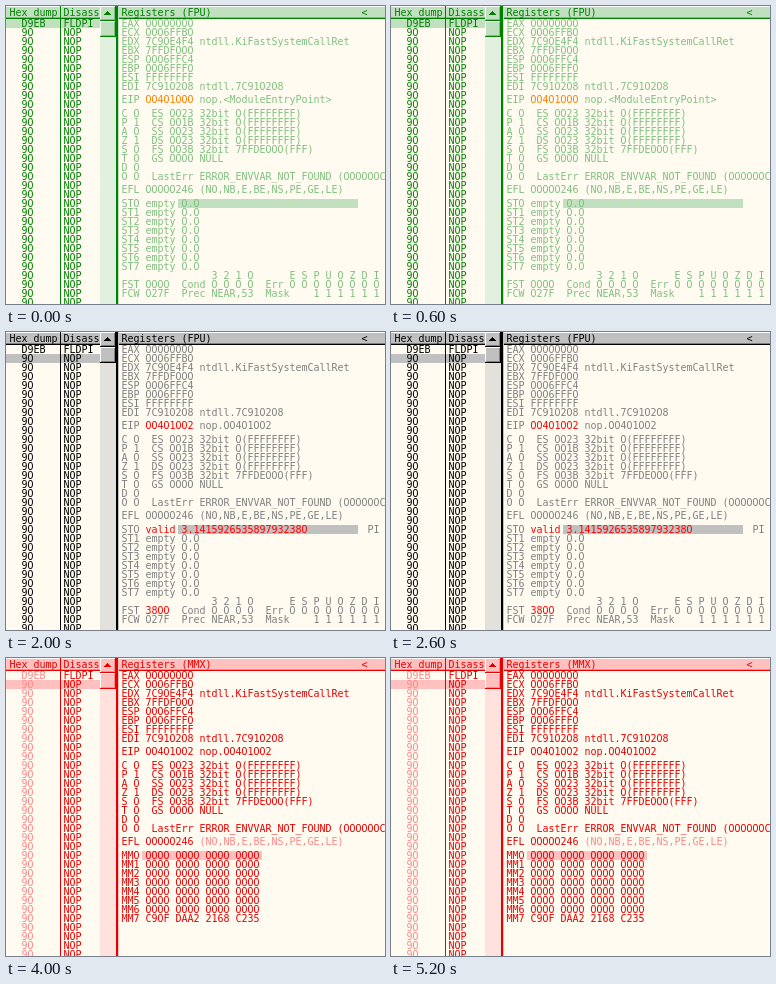
These frames come from a looping animation (379x298 px, 6000 ms). An HTML page with a canvas:

```html
<!DOCTYPE html>
<html lang="en">
<head>
<meta charset="utf-8">
<title>Debugger registers</title>
<style>
html, body { margin: 0; width: 379px; height: 298px; overflow: hidden; background: #fffbf0; }
canvas { display: block; }
</style>
</head>
<body>
<canvas id="stage" width="379" height="298"></canvas>
<script>
const ctx = document.getElementById('stage').getContext('2d');
const W = 379, H = 298, CELL = 6, ROW = 9, TOP = 13, LEFT = 116;
const PAPER = '#fffbf0';

const green = { ink: '#008000', dim: '#80c080', fill: '#c0e0c0', track: '#e2f0e0', hot: '#ff8000' };
const mono = { ink: '#000000', dim: '#808080', fill: '#c0c0c0', track: '#e3e1dc', hot: '#ff0000' };
const red = { ink: '#e80000', dim: '#ff8888', fill: '#ffc0c0', track: '#ffe2de', hot: '#e80000' };

const scenes = [
  { until: 1000, pal: green, row: 0 },
  { until: 2000, pal: mono, row: 0 },
  { until: 3000, pal: mono, row: 1, loaded: true },
  { until: 4000, pal: mono, row: 1, mmx: true },
  { until: 6000, pal: red, row: 1, mmx: true }
];

function box(x, y, w, h, color) {
  ctx.fillStyle = color;
  ctx.fillRect(x, y, w, h);
}

// One character per cell; zero comes from a face without an inner mark.
function print(text, x, base, color) {
  ctx.fillStyle = color;
  ctx.textAlign = 'center';
  for (let i = 0; i < text.length; i++) {
    const c = text[i];
    if (c === ' ') continue;
    ctx.font = c === '0' ? '10px "DejaVu Sans", sans-serif' : '10px "DejaVu Sans Mono", monospace';
    ctx.fillText(c, x + i * CELL + 2.5, base);
  }
}

function raised(x, y, w, h, p) {
  box(x, y, w, h, p.ink);
  box(x, y, w - 1, h - 1, '#ffffff');
  box(x + 1, y + 1, w - 2, h - 2, p.dim);
  box(x + 1, y + 1, w - 3, h - 3, p.fill);
}

function header(x, w, title, tx, p) {
  box(x, 0, w, 12, p.fill);
  box(x, 0, w, 1, '#ffffff');
  box(x, 11, w, 1, p.dim);
  box(x, 12, w, 1, p.ink);
  print(title, tx, 10, p.ink);
}

function scrollbar(p) {
  box(94, 0, 16, H, p.track);
  raised(94, 0, 16, 15, p);
  raised(94, 15, 16, 16, p);
  for (let i = 0; i < 4; i++) box(101 - i, 5 + i, 1 + 2 * i, 1, p.ink);
}

function listing(s) {
  const p = s.pal;
  box(0, TOP + s.row * ROW, 94, ROW, p.fill);
  for (let i = 0, y = TOP; y < H; i++, y += ROW) {
    print(i ? '90' : 'D9EB', 16, y + 8, s.mmx ? p.dim : p.ink);
    print(i ? 'NOP' : 'FLDPI', 58, y + 8, p.ink);
  }
  header(0, 54, 'Hex dump', 4, p);
  header(55, 39, 'Disass', 58, p);
  box(54, 0, 1, H, p.ink);
  scrollbar(p);
  box(110, 0, 2, H, p.ink);
  box(112, 0, 1, H, p.fill);
}

function registers(s) {
  const p = s.pal, ink = s.mmx ? p.ink : p.dim;
  const put = (text, col, y, color = ink) => print(text, LEFT + col * CELL, y + 8, color);
  const lines = (list, y) => list.forEach((t, i) => put(t, 0, y + i * ROW));

  header(113, W - 113, 'Registers (' + (s.mmx ? 'MMX' : 'FPU') + ')', LEFT, p);
  print('<', 356, 10, p.ink);

  lines([
    'EAX 00000000', 'ECX 0006FFB0', 'EDX 7C90E4F4 ntdll.KiFastSystemCallRet', 'EBX 7FFDF000',
    'ESP 0006FFC4', 'EBP 0006FFF0', 'ESI FFFFFFFF', 'EDI 7C910208 ntdll.7C910208'
  ], TOP);

  put('EIP', 0, 89);
  put(s.row ? '00401002' : '00401000', 4, 89, p.hot);
  put(s.row ? 'nop.00401002' : 'nop.<ModuleEntryPoint>', 13, 89);

  lines([
    'C 0  ES 0023 32bit 0(FFFFFFFF)', 'P 1  CS 001B 32bit 0(FFFFFFFF)',
    'A 0  SS 0023 32bit 0(FFFFFFFF)', 'Z 1  DS 0023 32bit 0(FFFFFFFF)',
    'S 0  FS 003B 32bit 7FFDE000(FFF)', 'T 0  GS 0000 NULL', 'D 0',
    'O 0  LastErr ERROR_ENVVAR_NOT_FOUND (000000CB)'
  ], 103);

  put('EFL 00000246', 0, 179);
  put('(NO,NB,E,BE,NS,PE,GE,LE)', 13, 179, p.dim);

  if (s.mmx) vectors(p, put);
  else floats(s, p, put, lines);
}

function vectors(p, put) {
  box(136, 193, 120, ROW, p.fill);
  for (let i = 0; i < 8; i++) {
    const y = 193 + i * ROW;
    put('MM' + i, 0, y);
    if (i < 7) put('0000 0000 0000 0000', 4, y);
    else put('C90F DAA2 2168 C235', 4, y, p.hot);
  }
}

function floats(s, p, put, lines) {
  box(172, 193, 180, ROW, p.fill);
  for (let i = 0; i < 8; i++) {
    const y = 193 + i * ROW;
    put('ST' + i, 0, y);
    if (s.loaded && i === 0) {
      put('valid 3.1415926535897932380', 4, y, p.hot);
      put('PI', 41, y);
    } else {
      put('empty 0.0', 4, y);
    }
  }
  lines([
    '               3 2 1 0      E S P U O Z D I',
    'FST       Cond 0 0 0 0  Err 0 0 0 0 0 0 0 0',
    'FCW 027F  Prec NEAR,53  Mask    1 1 1 1 1 1'
  ], 265);
  put(s.loaded ? '3800' : '0000', 4, 274, s.loaded ? p.hot : p.dim);
}

function draw(now) {
  const t = now % 6000;
  const scene = scenes.find(s => t < s.until);
  box(0, 0, W, H, PAPER);
  listing(scene);
  registers(scene);
  requestAnimationFrame(draw);
}

draw(performance.now());
</script>
</body>
</html>
```
